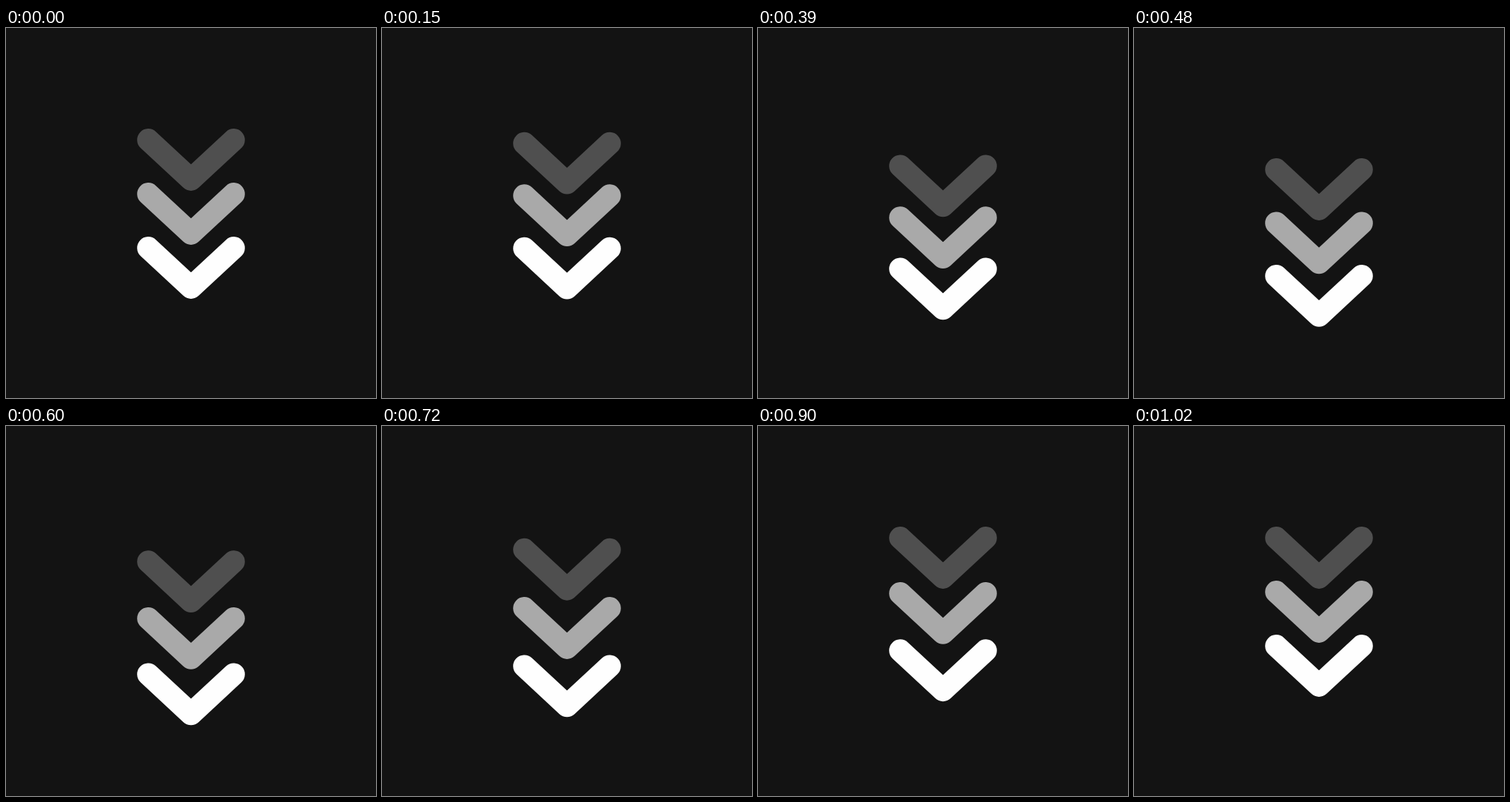
An HTML page that plays this animation: 500x500 px, repeating every 1.05 s.

```html
<!DOCTYPE html>
<html lang="en">
<head>
<meta charset="utf-8">
<title>Scroll down</title>
<style>
  html, body { margin: 0; height: 100%; overflow: hidden; background: #131313; }
  svg { display: block; width: 100%; height: 100%; }
  path { fill: none; stroke-width: 30.2; stroke-linecap: round; stroke-linejoin: round; }
</style>
</head>
<body>
<svg viewBox="0 0 500 500">
  <path stroke="#4f4f4f" d="M192.3 151.2 L250 204.8 L307.7 151.2"/>
  <path stroke="#a9a9a9" d="M192.3 224.2 L250 277.8 L307.7 224.2"/>
  <path stroke="#fefefe" d="M192.3 297.2 L250 350.8 L307.7 297.2"/>
</svg>
<script>
  const STEP = 30, STEPS = 35, DROP = 40;
  const chevrons = document.querySelectorAll('path');

  // Smooth ease from 0 to 1 between steps a and b
  function ease(step, a, b) {
    const s = Math.min(1, Math.max(0, (step - a) / (b - a)));
    return s * s * (3 - 2 * s);
  }

  function draw() {
    const step = Math.floor(performance.now() / STEP) % STEPS;
    chevrons.forEach((chevron, i) => {
      // Each lower chevron starts one step later and returns more slowly
      const down = ease(step, 2 + i, 16 + i);
      const up = ease(step, 16 + i, 30 + 2 * i);
      chevron.setAttribute('transform', `translate(0 ${DROP * (down - up)})`);
    });
    requestAnimationFrame(draw);
  }
  draw();
</script>
</body>
</html>
```
